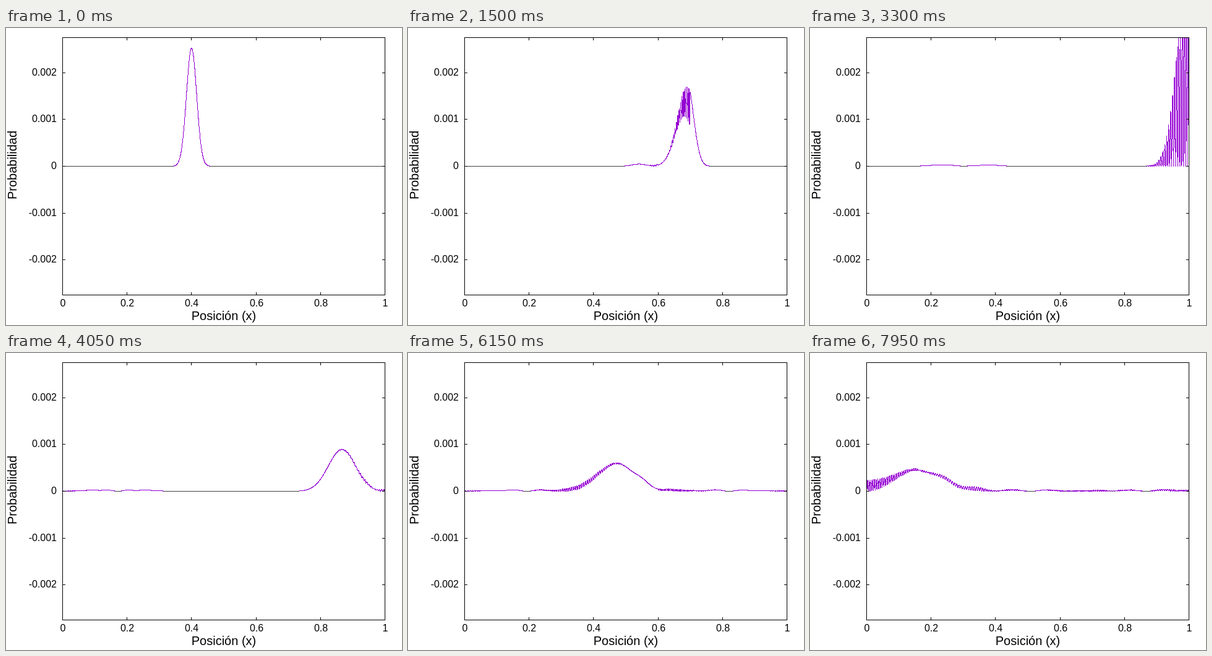
Write an HTML page that moves like this. It is 640 px wide and 480 px high and loops after 8 s.

```html
<!DOCTYPE html>
<html lang="es">
<head>
<meta charset="utf-8">
<title>Paquete de ondas</title>
<style>
  html, body { margin: 0; width: 100%; height: 100%; overflow: hidden; background: #fff; }
  svg { display: block; width: 640px; height: 480px; }
  text { font: 16px "Liberation Sans", Arial, sans-serif; fill: #000; }
  .title { font-size: 20px; }
  path { shape-rendering: crispEdges; }
</style>
</head>
<body>
<svg viewBox="0 0 640 480">
  <rect width="640" height="480" fill="#fff"/>
  <path id="flat" fill="#404040"/>
  <path id="curve" fill="#9400d3"/>
  <path id="axes" fill="none" stroke="#000"/>
  <g id="labels"></g>
  <text class="title" x="352" y="472" text-anchor="middle">Posición (x)</text>
  <text class="title" transform="translate(17 221.5) rotate(-90)" text-anchor="middle">Probabilidad</text>
</svg>
<script>
const start = performance.now();
const LOOP = 8000, FRAME = 150;
const LEFT = 91, RIGHT = 612, TOP = 15, BOTTOM = 431, ZERO = 223;
const UNIT = (BOTTOM - TOP) / 0.0055;
const $ = id => document.getElementById(id);
const px = x => Math.round(LEFT + (RIGHT - LEFT) * x);
const py = p => Math.round(ZERO - UNIT * p);

function drawAxes() {
  let d = `M${LEFT + .5} ${TOP + .5}H${RIGHT + .5}V${BOTTOM + .5}H${LEFT + .5}Z`;
  let labels = '';
  for (let i = 0; i <= 5; i++) {
    const x = px(i / 5);
    d += `M${x + .5} ${TOP}v5M${x + .5} ${BOTTOM + 1}v-5`;
    labels += `<text x="${x + 1}" y="450" text-anchor="middle">${i / 5}</text>`;
  }
  for (let i = -2; i <= 2; i++) {
    const y = py(i / 1000);
    d += `M${LEFT} ${y + .5}h5M${RIGHT + 1} ${y + .5}h-5`;
    labels += `<text x="82" y="${y + 5}" text-anchor="end">${i / 1000}</text>`;
  }
  $('axes').setAttribute('d', d);
  $('labels').innerHTML = labels;
}

// Schrödinger equation in a box with a square well, Crank-Nicolson scheme
const N = 5000, H = 1 / N, K = 525, DEPTH = 0.9;
const SUBSTEPS = 50, DT = 5.01e-5 / SUBSTEPS;
const G = 4 * H * H / DT;
const PEAK = 0.0025231;
const array = () => new Float64Array(N + 1);
const re = array(), im = array();
const gr = array(), gi = array();
const br = array(), bi = array();

function setup() {
  for (let j = 1; j < N; j++) {
    const x = j * H, amp = Math.exp(-1000 * (x - 0.4) ** 2);
    re[j] = amp * Math.cos(K * x);
    im[j] = amp * Math.sin(K * x);
    const inWell = x >= 0.6 && x <= 0.7;
    const ar = -2 + (inWell ? DEPTH * (K * H) ** 2 : 0) - gr[j - 1];
    const ai = G - gi[j - 1];
    const m = ar * ar + ai * ai;
    gr[j] = ar / m;
    gi[j] = -ai / m;
  }
}

function advance() {
  for (let s = 0; s < SUBSTEPS; s++) {
    for (let j = 1; j < N; j++) {
      const r = -2 * G * im[j] - br[j - 1], i = 2 * G * re[j] - bi[j - 1];
      br[j] = gr[j] * r - gi[j] * i;
      bi[j] = gr[j] * i + gi[j] * r;
    }
    let cr = 0, ci = 0;
    for (let j = N - 1; j > 0; j--) {
      const r = br[j] - gr[j] * cr + gi[j] * ci;
      ci = bi[j] - gr[j] * ci - gi[j] * cr;
      cr = r;
      re[j] = cr - re[j];
      im[j] = ci - im[j];
    }
  }
}

// Each pixel column becomes one bar from its highest to its lowest row
function trace() {
  const lo = [], hi = [];
  const mark = (x, y) => {
    lo[x] = Math.min(lo[x] ?? y, y);
    hi[x] = Math.max(hi[x] ?? y, y);
  };
  let lastX = LEFT, lastY = ZERO;
  for (let j = 0; j <= N; j++) {
    const x = px(j * H), y = py(PEAK * (re[j] ** 2 + im[j] ** 2));
    if (x !== lastX) {
      const mid = (lastY + y) / 2;
      mark(lastX, lastY < y ? Math.floor(mid) : Math.ceil(mid));
      mark(x, lastY < y ? Math.ceil(mid) : Math.floor(mid));
    }
    mark(x, y);
    lastX = x;
    lastY = y;
  }
  let flat = '', curve = '';
  for (let x = LEFT + 1; x < RIGHT; x++) {
    const y = Math.max(lo[x], TOP + 1), h = hi[x] - y + 1;
    if (h < 1) continue;
    const bar = `M${x} ${y}h1v${h}h-1z`;
    if (lo[x] === ZERO) flat += bar;
    else curve += bar;
  }
  return { flat, curve };
}

const frames = [];
function getFrame(n) {
  while (frames.length <= n) {
    if (frames.length) advance();
    frames.push(trace());
  }
  return frames[n];
}

let shown = -1;
function render() {
  const n = Math.floor((performance.now() - start) % LOOP / FRAME);
  if (n !== shown) {
    const { flat, curve } = getFrame(n);
    $('flat').setAttribute('d', flat);
    $('curve').setAttribute('d', curve);
    shown = n;
  }
  requestAnimationFrame(render);
}

drawAxes();
setup();
render();
</script>
</body>
</html>
```
